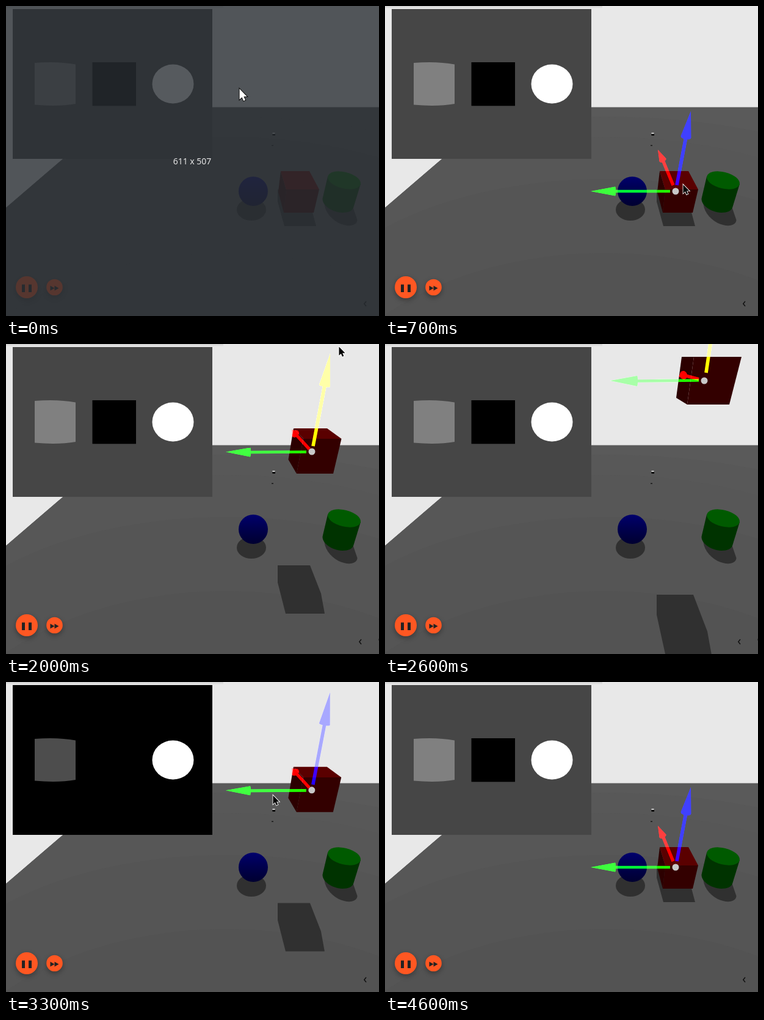
These frames come from a looping animation (611 px wide and 507 px high, 4700 ms). An HTML page with a canvas:

```html
<!DOCTYPE html>
<html lang="en">
<head>
<meta charset="utf-8">
<title>Depth camera scene</title>
<style>
html, body { margin: 0; width: 100%; height: 100%; overflow: hidden; background: #e8e8e8; }
canvas { display: block; }
</style>
</head>
<body>
<canvas id="stage" width="611" height="507"></canvas>
<script>
const ctx = document.getElementById('stage').getContext('2d');
const LOOP = 4700, STEP = 100;
const RELEASE = 2675, DROP = 4.8, SENSOR_LAG = 157;

// Each point has three poses [x, y, x, y, x, y]: resting, half raised, fully raised.
const BOX = {
  ftl: [459, 300, 487, 155, 506, 21], ftr: [513, 300, 549.5, 155, 584, 21],
  fbl: [455, 338, 476, 212, 495, 99], fbr: [504, 338, 536, 212, 564, 99],
  btl: [450, 270, 471, 138, 486, 21], btr: [497, 270, 526, 138, 576, 21],
  bbl: [446, 304, 462.5, 189, 477, 88]
};
const BOX_SHADOW = [
  [445, 300, 445, 362, 445, 410], [490, 300, 498, 362, 505, 410],
  [500, 330, 516, 408, 528, 470], [508, 360, 522, 441, 538, 525],
  [456, 360, 458, 441, 463, 525], [445, 320, 445, 390, 445, 443]
];
const ORIGIN = [476, 303, 501, 176, 523, 60];
const ARROWS = [
  { color: '#f00', shaft: 2.5, wide: [6, 6.5, 7], deep: [3, 5, 6],
    from: [472, 293, 497, 172, 514, 57.5], base: [455, 252, 474, 147, 489, 51], tip: [447, 235, 468, 140, 481, 53] },
  { color: '#0f0', shaft: 2.3, wide: [7.5, 7.5, 8.5], deep: [1, 1, 1],
    from: [467, 303, 492, 176.5, 514, 59.5], base: [377, 303, 400, 177, 413, 60.5], tip: [337, 303, 360, 176.5, 369, 60] },
  { color: '#00f', shaft: 2.8, wide: [8.5, 9, 10], deep: [4, 2, 1],
    from: [478, 293, 503, 167, 526, 47], base: [493, 214, 522, 68, 544, -75], tip: [501, 172, 531, 16, 554, -140] }
];

// Keys are [time, value...]
const LIFT = [[1400, 0], [1500, 0.07], [1900, 0.75], [2000, 1], [2200, 1.45], [2400, 1.8], [2600, 2]];
const POINTER = [[100, 499, 335], [400, 487, 310], [600, 487, 310], [1200, 493, 200], [1400, 493, 200],
  [1500, 495, 186], [1900, 537, 52], [2000, 545, 4], [2200, 565, -70], [3000, 520, -40],
  [3300, 437, 185], [3600, 430, 60], [3700, 430, -40]];
const PANEL_OUT = [[100, 700], [1000, 1400], [1800, 2800], [3700, 4400]];

function keyed(keys, t) {
  if (t <= keys[0][0]) return keys[0].slice(1);
  for (let i = 1; i < keys.length; i++) {
    const [a, b] = [keys[i - 1], keys[i]];
    if (t <= b[0]) {
      const k = (t - a[0]) / (b[0] - a[0]);
      return a.slice(1).map((v, j) => v + (b[j + 1] - v) * k);
    }
  }
  return keys[keys.length - 1].slice(1);
}

// Quadratic through the three poses at u = 0, 1, 2
const mix = (a, b, c, u) => a * (u - 1) * (u - 2) / 2 + b * u * (2 - u) + c * u * (u - 1) / 2;
const pose = (p, u) => [mix(p[0], p[2], p[4], u), mix(p[1], p[3], p[5], u)];

const fallHeight = t => Math.max(0, DROP - 4.9 * ((t - RELEASE) / 1000) ** 2);

function lift(t) {
  if (t < RELEASE) return keyed(LIFT, t)[0];
  const h = fallHeight(t);
  return 0.235 * h + 0.0378 * h * h;
}

function rect(color, x, y, w, h) {
  ctx.fillStyle = color;
  ctx.fillRect(x, y, w, h);
}

function poly(color, points) {
  ctx.fillStyle = color;
  ctx.beginPath();
  points.forEach(p => ctx.lineTo(...p));
  ctx.closePath();
  ctx.fill();
}

function oval(color, x, y, rx, ry = rx, turn = 0) {
  ctx.fillStyle = color;
  ctx.beginPath();
  ctx.ellipse(x, y, rx, ry, turn, 0, Math.PI * 2);
  ctx.fill();
}

function shape(color, path) {
  ctx.fillStyle = color;
  ctx.fill(new Path2D(path));
}

function drawGround() {
  rect('#e8e8e8', 0, 0, 611, 507);
  ctx.save();
  ctx.beginPath();
  [[0, 330], [192, 165.5], [611, 165.5], [611, 507], [0, 507]].forEach(p => ctx.lineTo(...p));
  ctx.clip();
  rect('#5a5a5a', 0, 160, 611, 347);
  [[181, 180, '#585858'], [214, 250, '#575757'], [283, 260, '#555555'], [404, 330, '#535353']]
    .forEach(([top, ry, color]) => oval(color, 360, top + ry, 500, ry));
  ctx.restore();
  rect('#fff', 436.5, 207.5, 4, 1.5);
  rect('#000', 436.5, 209, 4.5, 3);
  rect('#111', 435, 227.5, 3, 1.3);
}

function drawSolids(u) {
  poly('#303030', BOX_SHADOW.map(p => pose(p, u)));
  oval('#303030', 402, 333, 24, 18);
  shape('#303030', 'M521 318C521 334 530 347 545 355C560 362 575 360 575.5 350L568 328Z');

  const blue = ctx.createLinearGradient(0, 279, 0, 327);
  blue.addColorStop(0, '#00006c');
  blue.addColorStop(0.5, '#00004c');
  blue.addColorStop(1, '#000030');
  oval(blue, 405, 303, 24);

  shape('#003300', 'M527 279L518.5 315C518 326 533 337 551 338C561 338 567 335 569 330L581 291Z');
  oval('#005a00', 554, 285, 27.5, 13.5, 0.24);

  const v = {};
  for (const name in BOX) v[name] = pose(BOX[name], u);
  poly('#2c0000', [v.btl, v.ftl, v.fbl, v.bbl]);
  if (v.btl[1] < v.ftl[1]) poly('#5a0000', [v.btl, v.btr, v.ftr, v.ftl]);
  poly('#330000', [v.ftl, v.ftr, v.fbr, v.fbl]);
}

function drawArrow(arrow, u, color) {
  const [fx, fy] = pose(arrow.from, u), [bx, by] = pose(arrow.base, u), [tx, ty] = pose(arrow.tip, u);
  const wide = mix(...arrow.wide, u), deep = mix(...arrow.deep, u);
  const path = new Path2D();
  const add = points => {
    path.moveTo(...points[0]);
    points.slice(1).forEach(p => path.lineTo(...p));
    path.closePath();
  };
  const side = (x, y, angle, r) => [x - Math.sin(angle) * r, y + Math.cos(angle) * r];
  const along = Math.atan2(by - fy, bx - fx), head = Math.atan2(ty - by, tx - bx), s = arrow.shaft;
  add([side(bx, by, along, -s), side(bx, by, along, s), side(fx, fy, along, s), side(fx, fy, along, -s)]);
  add([[tx, ty], side(bx, by, head, wide), side(bx, by, head, -wide)]);
  path.moveTo(bx + Math.cos(head) * deep, by + Math.sin(head) * deep);
  path.ellipse(bx, by, deep, wide, head, 0, Math.PI * 2);
  // Dim what lies behind, then add the light of the arrow
  ctx.fillStyle = 'rgba(0,0,0,.28)';
  ctx.fill(path);
  ctx.globalCompositeOperation = 'lighter';
  ctx.fillStyle = color;
  ctx.fill(path);
  ctx.globalCompositeOperation = 'source-over';
}

function drawGizmo(t, u) {
  const dragging = t >= 1500 && t < RELEASE;
  ARROWS.forEach((a, i) => drawArrow(a, u, dragging && i === 2 ? '#ff0' : a.color));
  oval('#c8c8c8', ...pose(ORIGIN, u), 5.5);
}

function drawDepth(t) {
  const seen = t - SENSOR_LAG;
  const rise = 72 * (seen < RELEASE ? 0 : fallHeight(seen));
  const inView = rise < 158;
  ctx.save();
  ctx.beginPath();
  ctx.rect(11, 5, 327, 245);
  ctx.clip();
  rect(inView ? '#464646' : '#000', 11, 5, 327, 245);
  shape(inView ? '#808080' : '#4d4d4d', 'M47 93Q85 90 114 95.5V160Q85 165 47 161.5Z');
  if (inView) rect('#000', 141.5, 92 - rise, 71.5, 71.3);
  oval('#fff', 273.5, 127.5, 34, 32);
  ctx.restore();
}

function drawControls(t) {
  const strip = ctx.createLinearGradient(0, 0, 0, 4);
  strip.addColorStop(0, '#cfcfcf');
  strip.addColorStop(1, '#e8e8e8');
  rect(strip, 0, 0, 356, 4);

  ctx.save();
  ctx.shadowColor = 'rgba(0,0,0,.35)';
  ctx.shadowBlur = 9;
  ctx.shadowOffsetY = 3;
  oval('#ff5722', 34, 460, 18);
  oval('#ff5722', 79.5, 460, 13.3);
  ctx.restore();
  rect('#222', 26, 455.5, 5, 12.5);
  rect('#222', 37, 455.5, 5, 12.5);
  for (const x of [72.5, 79.5]) poly('#222', [[x, 457.5], [x + 7, 461.5], [x, 465.5]]);

  const out = PANEL_OUT.some(([a, b]) => t >= a && t < b);
  const x = out ? 578 : 586;
  ctx.strokeStyle = '#111';
  ctx.lineWidth = 1.5;
  ctx.beginPath();
  ctx.moveTo(x + 4, 483);
  ctx.lineTo(x + 0.8, 487);
  ctx.lineTo(x + 4, 491);
  ctx.stroke();
  if (out) rect('#333', 610, 482, 1, 3);
}

function drawPointer(x, y, size, fill, line) {
  ctx.save();
  ctx.translate(x, y);
  ctx.scale(size, size);
  const arrow = new Path2D('M.5 .5V15.5L4 12.3L6.3 17.5L8.7 16.4L6.4 11.3H11Z');
  ctx.lineWidth = 1.8;
  ctx.strokeStyle = line;
  ctx.stroke(arrow);
  ctx.fillStyle = fill;
  ctx.fill(arrow);
  ctx.restore();
}

function drawSizeHint() {
  rect('rgba(41,46,51,.79)', 0, 0, 611, 507);
  ctx.fillStyle = '#e4e4e4';
  ctx.font = '14px "Noto Sans", "Open Sans", sans-serif';
  ctx.textAlign = 'center';
  ctx.fillText('611 x 507', 305, 259);
  drawPointer(382, 135, 1.15, '#fff', '#111');
}

function draw(t) {
  const u = lift(t);
  drawGround();
  drawSolids(u);
  if (t >= 700) drawGizmo(t, u);
  drawControls(t);
  drawDepth(t);
  if (t < 100) drawSizeHint();
  else if (t < 3700) drawPointer(...keyed(POINTER, t), 0.95, '#000', '#fff');
}

const start = performance.now();
function tick() {
  const t = (performance.now() - start) % LOOP;
  draw(Math.floor(t / STEP) * STEP);
  requestAnimationFrame(tick);
}
tick();
</script>
</body>
</html>
```
